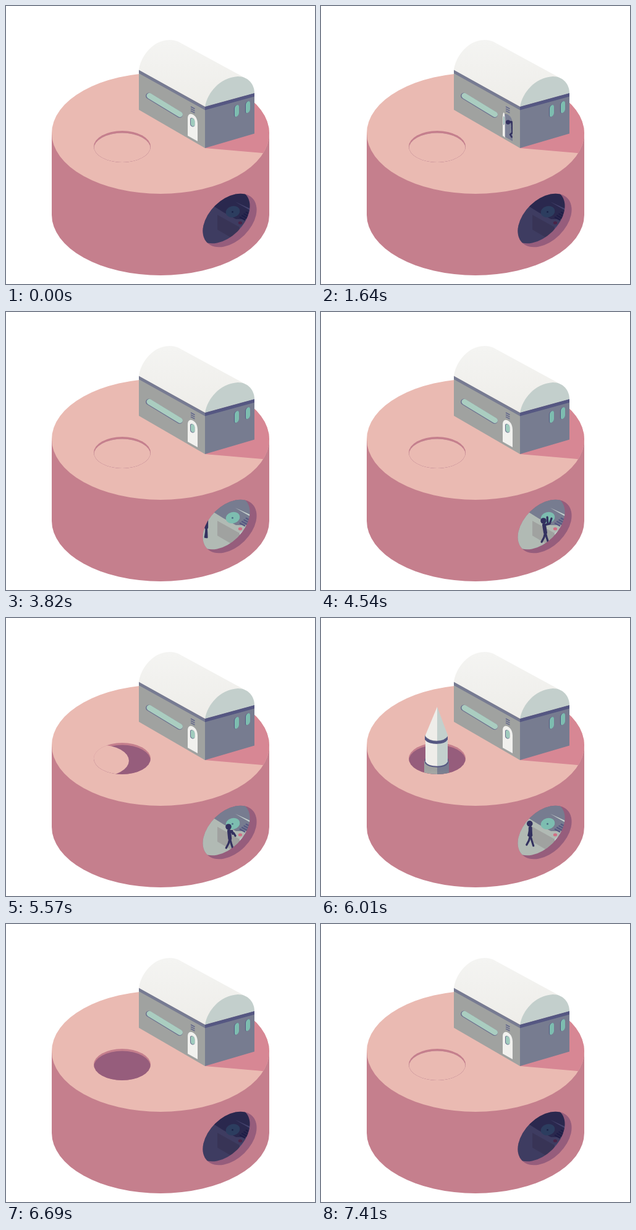
An HTML page for the animation above (8.61 s loop, 500x450 px).

```html
<!DOCTYPE html>
<html lang="en">
<head>
<meta charset="utf-8">
<title>Rocket silo</title>
<style>
  html, body { margin: 0; width: 100%; height: 100%; overflow: hidden; background: #fff; }
  svg { display: block; width: 100vw; height: 100vh; }
  .room { isolation: isolate; }
  #dark { mix-blend-mode: multiply; }
  .body { fill: none; stroke: #33315f; stroke-linecap: round; stroke-linejoin: round; }
</style>
</head>
<body>
<svg viewBox="0 0 500 450">
  <defs>
    <linearGradient id="roofTone" x1="0" y1="0" x2="0" y2="1">
      <stop offset="0" stop-color="#f4f4f2"/><stop offset="1" stop-color="#eeede9"/>
    </linearGradient>
    <linearGradient id="stageLeft" x1="0" y1="0" x2="0" y2="1">
      <stop offset=".2" stop-color="#9fa2a0"/><stop offset="1" stop-color="#c2c5bf"/>
    </linearGradient>
    <linearGradient id="stageRight" x1="0" y1="0" x2="0" y2="1">
      <stop offset=".2" stop-color="#777c90"/><stop offset=".9" stop-color="#949a92"/>
    </linearGradient>
    <linearGradient id="skyFade" gradientUnits="userSpaceOnUse" x1="0" y1="5" x2="0" y2="88">
      <stop offset="0" stop-color="#fff" stop-opacity="0"/><stop offset="1" stop-color="#fff"/>
    </linearGradient>
    <mask id="sky" style="mask-type:alpha" maskUnits="userSpaceOnUse" x="0" y="0" width="500" height="450">
      <rect width="500" height="450" fill="url(#skyFade)"/>
    </mask>
    <clipPath id="topClip"><ellipse cx="250" cy="206" rx="176" ry="98"/></clipPath>
    <clipPath id="holeClip"><ellipse cx="188" cy="227.5" rx="46" ry="25.5"/></clipPath>
    <clipPath id="launchClip">
      <path d="M0 0H500V227.5H234A46 25.5 0 0 1 142 227.5H0Z"/>
    </clipPath>
    <ellipse id="port" rx="51.4" ry="33.6" transform="rotate(-44.5)"/>
    <clipPath id="outerClip"><ellipse rx="51.4" ry="33.6" transform="translate(362 347) rotate(-44.5)"/></clipPath>
    <clipPath id="innerClip"><ellipse rx="51.4" ry="33.6" transform="translate(351 341) rotate(-44.5)"/></clipPath>
    <path id="doorShape" d="M294 210V182C294 174 299 173.500 303 176C307.500 178.800 310 184 310 190V219Z"/>
    <clipPath id="doorClip"><use href="#doorShape"/></clipPath>
  </defs>

  <!-- drum -->
  <path fill="#c57f8d" d="M74 206V338A176 98 0 0 0 426 338V206Z"/>
  <ellipse cx="250" cy="206" rx="176" ry="98" fill="#eabab2"/>
  <path clip-path="url(#topClip)" fill="#d78794" d="M322 230L415 238L440 240V140H400Z"/>

  <!-- hatch -->
  <g clip-path="url(#holeClip)">
    <ellipse cx="188" cy="227.500" rx="47" ry="26.500" fill="#c57f8d"/>
    <ellipse cx="188" cy="231" rx="46" ry="25.500" fill="#965d7c"/>
    <ellipse id="lid" cx="188" cy="231" rx="46" ry="25.500" fill="#eabab2"/>
  </g>

  <!-- house -->
  <path fill="#a0a2a0" d="M215 104V168L322 230V163Z"/>
  <path fill="#777c90" d="M322 163V230L402 206.500V141Z"/>
  <path fill="url(#roofTone)" d="M215 104C217 84 236 55 265 55Q275 55 283 60L386 116L360 150L322 163Z"/>
  <path fill="#c3cfcc" d="M322 163C326 140 346 116 375 114C392 114 402 127 402 141Z"/>
  <path fill="#777b92" d="M215 103.500V109L322 168.500V163Z"/>
  <path fill="#555782" d="M322 163V168.500L402 146.500V141Z"/>
  <g fill="none" stroke-linecap="round">
    <path stroke="#6a6f8e" stroke-width="10" d="M231 145.500L281 176"/>
    <path stroke="#aacdc0" stroke-width="9" d="M232 145.300L281.500 175.500"/>
  </g>
  <path stroke="#62668b" stroke-width="1.500" d="M299 163L305.500 166.500M299 166.300L305.500 169.800M299 169.600L305.500 173.100"/>
  <g id="panes"></g>

  <!-- doorway -->
  <g clip-path="url(#doorClip)">
    <use href="#doorShape" fill="#7c8196"/>
    <g id="peek">
      <circle cx="302.500" cy="188" r="3.600" fill="#33315f"/>
      <path class="body" stroke-width="3.600" d="M304 187.500L309 188L310 197"/>
      <path class="body" stroke-width="2.600" d="M309 196L309.500 205L306 208L308.500 212"/>
    </g>
  </g>
  <g id="door">
    <use href="#doorShape" fill="#f1f1ee"/>
    <path fill="#6a6f8e" d="M298 191V183.500C298 179 305.300 181 305.300 187V193C305.300 197 298 196 298 191Z"/>
    <path fill="#9fcbbd" d="M299 191V183.500C299 179.500 305.300 181.500 305.300 187V192.500C305.300 196 299 195 299 191Z"/>
  </g>

  <!-- porthole -->
  <use href="#port" x="0" y="0" transform="translate(362 347)" fill="#965d7c"/>
  <g clip-path="url(#outerClip)">
    <g class="room" clip-path="url(#innerClip)">
      <rect x="300" y="290" width="110" height="105" fill="#b1bab4"/>
      <path fill="#777c90" d="M328 319L352 334L372 345H410V290H328Z"/>
      <path fill="#a0a2a0" d="M342 338V362L378 383V358Z"/>
      <path fill="#c5d0cd" d="M342 338L371 317L406 337L378 358V390H410V335L371 317Z"/>
      <ellipse rx="11.500" ry="9" transform="translate(367 333) rotate(-14)" fill="#7dbdb0"/>
      <circle cx="366.500" cy="333.300" r="1.500" fill="#4d6f86"/>
      <path id="slots" stroke="#555782" stroke-width="2.200"/>
      <ellipse cx="379" cy="351" rx="3.200" ry="2.500" fill="#d06f85"/>
      <g id="worker">
        <circle id="head" r="4.800" fill="#33315f"/>
        <path id="torso" class="body" stroke-width="6"/>
        <path id="limbs" class="body" stroke-width="3.200"/>
      </g>
      <rect id="dark" x="300" y="290" width="110" height="105" fill="#595289"/>
    </g>
  </g>

  <!-- rocket, nose tip at the origin -->
  <g clip-path="url(#launchClip)"><g mask="url(#sky)"><g id="rocket">
    <path fill="#eeede9" d="M-15.500 140V150Q-15 157 0 158V140Z" transform="translate(-.5 -16)"/>
    <path fill="#eeede9" d="M-15.500 138V157Q-12 163 0 163V138Z"/>
    <path fill="#d9dedb" d="M14.500 138V157Q11 163 0 163V138Z"/>
    <path fill="url(#stageLeft)" d="M-21 88V143Q-17 151 0 151V88Z"/>
    <path fill="url(#stageRight)" d="M19 88V143Q15 151 0 151V88Z"/>
    <path fill="#555782" d="M-20 84V91Q-15 98 0 98Q14 98 18 91V84Z"/>
    <path fill="#eeede9" d="M-19 50V89Q-15 96 0 96V50Z"/>
    <path fill="#c3d0cd" d="M17 50V89Q13 96 0 96V50Z"/>
    <path fill="#777c90" d="M-20 46V53Q-15 60 0 60V46Z"/>
    <path fill="#555782" d="M17 46V53Q13 60 0 60V46ZM-20 48V53Q-15 60 0 60V56Q-14 55 -20 48Z"/>
    <path fill="#eeede9" d="M0 0L-19.500 47Q-14 55 0 55Z"/>
    <path fill="#c3d0cd" d="M0 0L17.500 47Q12 55 0 55Z"/>
  </g></g></g>
</svg>

<script>
const LOOP = 8610;
const $ = id => document.getElementById(id);
const ramp = (t, a, b) => Math.min(1, Math.max(0, (t - a) / (b - a)));
const ease = p => p * p * (3 - 2 * p);
const span = (t, a, b) => ease(ramp(t, a, b));
const mix = (a, b, p) => a + (b - a) * p;
const line = pts => "M" + pts.map(p => p.map(v => v.toFixed(2)).join(" ")).join("L");

const pill = (x, y, w, fill) =>
  `<path fill="${fill}" d="M${x} ${y + 5}C${x} ${y} ${x + w} ${y - 4} ${x + w} ${y + 2}V${y + 12}C${x + w} ${y + 17} ${x} ${y + 21} ${x} ${y + 16}Z"/>`;
$("panes").innerHTML = [[369, 161], [387, 155]].map(([x, y]) =>
  pill(x, y, 8, "#555782") + pill(x + 1, y, 7, "#7dbdb0")).join("");
$("slots").setAttribute("d", [0, 1, 2, 3].map(i =>
  line([[378 + 3.3 * i, 341.5 - 2.7 * i], [387 + 3.3 * i, 346.5 - 2.7 * i]])).join(""));

function drawDoor(t) {
  const open = span(t, 660, 1140) - span(t, 1620, 2160);
  const sx = 1 - 0.77 * open, skew = -0.37 * open;
  $("door").setAttribute("transform", `matrix(${sx} ${skew} 0 1 ${294 * (1 - sx)} ${-294 * skew})`);
  const lean = span(t, 800, 1140) - span(t, 1620, 1960);
  $("peek").setAttribute("transform", `translate(${10 * (1 - lean)} ${3 * (1 - lean)})`);
}

function drawWorker(t) {
  const shown = t >= 3640 && t < 6310;
  $("worker").setAttribute("visibility", shown ? "visible" : "hidden");
  if (!shown) return;
  const goIn = ramp(t, 3640, 4420), goOut = ramp(t, 5770, 6290);
  const x = mix(312, 360, goIn - goOut);
  const y = 338 - (360 - x) * 0.23;
  const walking = (goIn < 1) || (goOut > 0);
  const swing = walking ? Math.sin((360 - x) * 0.31 + 0.9) : 1;
  const reach = span(t, 4220, 4520);
  const press = span(t, 4520, 4900);
  const drop = span(t, 5430, 5770);
  const up = reach * (1 - drop);

  const hand = (restX, restY, upX, upY, endX, endY) => [
    x + mix(restX, mix(upX, endX, press), up),
    y + mix(restY, mix(upY, endY, press), up)
  ];
  const shoulder = [x + 1, y + 7], hip = [x + 1 + 2 * up, y + 19];
  const arm = (h, bendX, bendY) => line([shoulder,
    [mix((shoulder[0] + h[0]) / 2, shoulder[0] + bendX, up), mix((shoulder[1] + h[1]) / 2, shoulder[1] + bendY, up)], h]);
  const leg = s => line([hip, [hip[0] + s * 2.2, hip[1] + 8], [hip[0] + s * 5.5 - 0.5, hip[1] + 16 + s * 0.8]]);

  $("head").setAttribute("cx", x);
  $("head").setAttribute("cy", y);
  $("torso").setAttribute("d", line([shoulder, hip]));
  $("limbs").setAttribute("d",
    arm(hand(3 * swing, 19, 6, -6, 9, 7), 6, -2) +
    arm(hand(-2 * swing, 19, 13, -4, 19, 12), 9, mix(-2, 3, press)) +
    leg(swing) + leg(-swing));
}

function drawLaunch(t) {
  const open = span(t, 5430, 5770) - span(t, 7050, 7410);
  $("lid").setAttribute("transform", `translate(${-94 * open} 0)`);
  const s = t - 6010;
  const tip = 144 - 0.3725 * s - 0.0001875 * s * s;
  const flying = t > 5600 && t < 6800;
  $("rocket").setAttribute("visibility", flying ? "visible" : "hidden");
  $("rocket").setAttribute("transform", `translate(188 ${tip})`);
}

function draw(t) {
  drawDoor(t);
  drawWorker(t);
  drawLaunch(t);
  $("dark").setAttribute("opacity", 1 - ramp(t, 3120, 3360) + ramp(t, 6490, 6690));
}

const start = performance.now();
function tick() {
  draw((performance.now() - start) % LOOP);
  requestAnimationFrame(tick);
}
draw(0);
requestAnimationFrame(tick);
</script>
</body>
</html>
```
